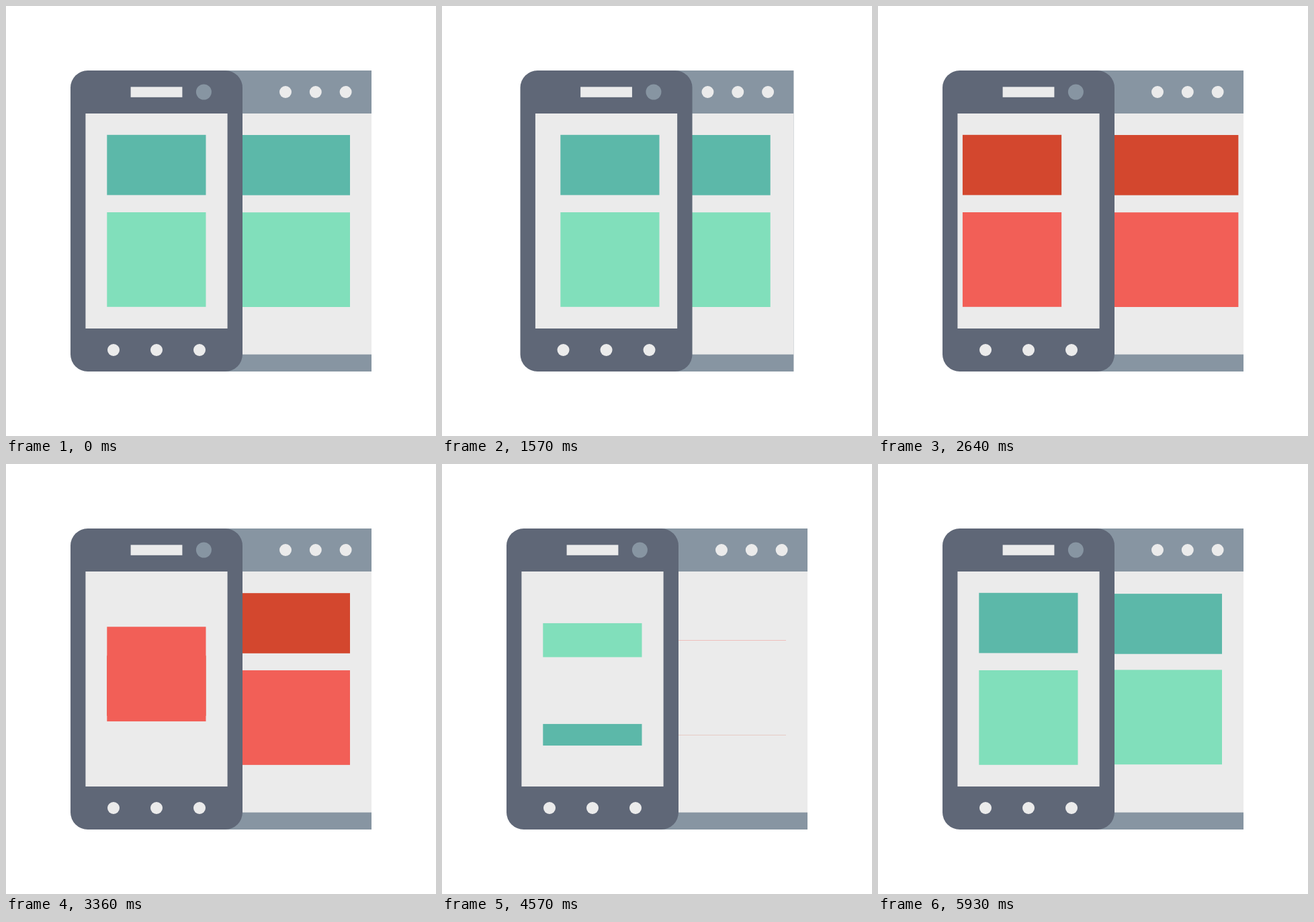
These frames come from a looping animation (640x640 px, 6 s). An HTML page:

```html
<!DOCTYPE html>
<html lang="en">
<head>
<meta charset="utf-8">
<title>Responsive layout</title>
<style>
  html, body { margin: 0; width: 100%; height: 100%; overflow: hidden; background: #fff; }
  svg { display: block; width: 100vw; height: 100vh; }

  g, .block {
    animation: 6s cubic-bezier(.65, 0, .35, 1) infinite;
  }
  .device { animation-name: device; }
  .browser { animation-name: browser; }
  .phone-blocks { animation-name: phone-shift; }
  .browser-blocks { animation-name: browser-shift; }

  .block { transform-box: fill-box; transform-origin: center; }
  .dark { --cool: #5cb8a9; --warm: #d3472e; --swap: 166.4px; fill: var(--cool); }
  .light { --cool: #81dfbb; --warm: #f25f57; --swap: -115.2px; fill: var(--cool); }
  .phone-blocks .block { animation-name: phone-swap, phone-flip, phone-tint; }
  .browser-blocks .block { animation-name: browser-swap, browser-flip, browser-tint; }

  .slate { fill: #5f6777; }
  .steel { fill: #8795a2; }
  .paper { fill: #ebebeb; }

  /* Spread apart, close up, open again */
  @keyframes device {
    0%, 22.5%, 41.95%, 100% { translate: 0 0; }
    11.25% { translate: -25.6px 0; }
    32.23% { translate: 96px 0; }
  }
  /* Inside the device group, so it travels twice as far the other way */
  @keyframes browser {
    0%, 22.5%, 41.95%, 100% { translate: 0 0; }
    11.25% { translate: 51.2px 0; }
    32.23% { translate: -192px 0; }
  }
  @keyframes phone-shift {
    0%, 22.5%, 51.67%, 100% { translate: 0 0; }
    11.25% { translate: -12.8px 0; }
    32.23% { translate: 25.6px 0; }
    41.95% { translate: -25.6px 0; }
  }
  @keyframes browser-shift {
    0%, 22.5%, 51.67%, 100% { translate: 0 0; }
    11.25% { translate: 12.8px 0; }
    32.23% { translate: -12.8px 0; }
    41.95% { translate: 25.6px 0; }
  }

  /* The two blocks trade places, then trade back */
  @keyframes phone-swap {
    0%, 51.67%, 94.67%, 100% { translate: 0 0; }
    60%, 84.67% { translate: 0 var(--swap); }
  }
  @keyframes browser-swap {
    0%, 55.67%, 99.72%, 100% { translate: 0 0; }
    65%, 89.83% { translate: 0 var(--swap); }
  }

  /* Flatten and regrow in the other colour */
  @keyframes phone-flip {
    0%, 62.67%, 81.33%, 100% { scale: 1 1; }
    72% { scale: 1 0; }
  }
  @keyframes browser-flip {
    0%, 67.33%, 86%, 100% { scale: 1 1; }
    76.67% { scale: 1 0; }
  }
  @keyframes phone-tint {
    0%, 32.23% { fill: var(--cool); }
    41.95% { fill: var(--warm); animation-timing-function: step-end; }
    72%, 100% { fill: var(--cool); }
  }
  @keyframes browser-tint {
    0%, 32.23% { fill: var(--cool); }
    41.95% { fill: var(--warm); animation-timing-function: step-end; }
    76.67%, 100% { fill: var(--cool); }
  }
</style>
</head>
<body>
<svg viewBox="0 0 640 640">
  <clipPath id="behind"><rect x="224" width="800" height="640"/></clipPath>
  <g class="device">
    <g clip-path="url(#behind)">
      <g class="browser">
        <rect class="steel" x="150" y="96" width="394" height="448"/>
        <rect class="paper" x="150" y="160" width="394" height="358.6"/>
        <circle class="paper" cx="416" cy="128" r="9"/>
        <circle class="paper" cx="460.8" cy="128" r="9"/>
        <circle class="paper" cx="505.6" cy="128" r="9"/>
        <g class="browser-blocks">
          <rect class="block dark" x="150" y="192" width="362" height="89.6"/>
          <rect class="block light" x="150" y="307.2" width="362" height="140.8"/>
        </g>
      </g>
    </g>
    <rect class="slate" x="96" y="96" width="256" height="448" rx="25.6"/>
    <rect class="paper" x="185.6" y="120.4" width="76.8" height="15.4"/>
    <circle class="steel" cx="294.4" cy="128" r="11.5"/>
    <rect class="paper" x="118.4" y="160" width="211.2" height="320"/>
    <circle class="paper" cx="160" cy="512" r="9"/>
    <circle class="paper" cx="224" cy="512" r="9"/>
    <circle class="paper" cx="288" cy="512" r="9"/>
    <g class="phone-blocks">
      <rect class="block dark" x="150.3" y="191.8" width="147.2" height="89.6"/>
      <rect class="block light" x="150.3" y="307" width="147.2" height="140.8"/>
    </g>
  </g>
</svg>
</body>
</html>
```
